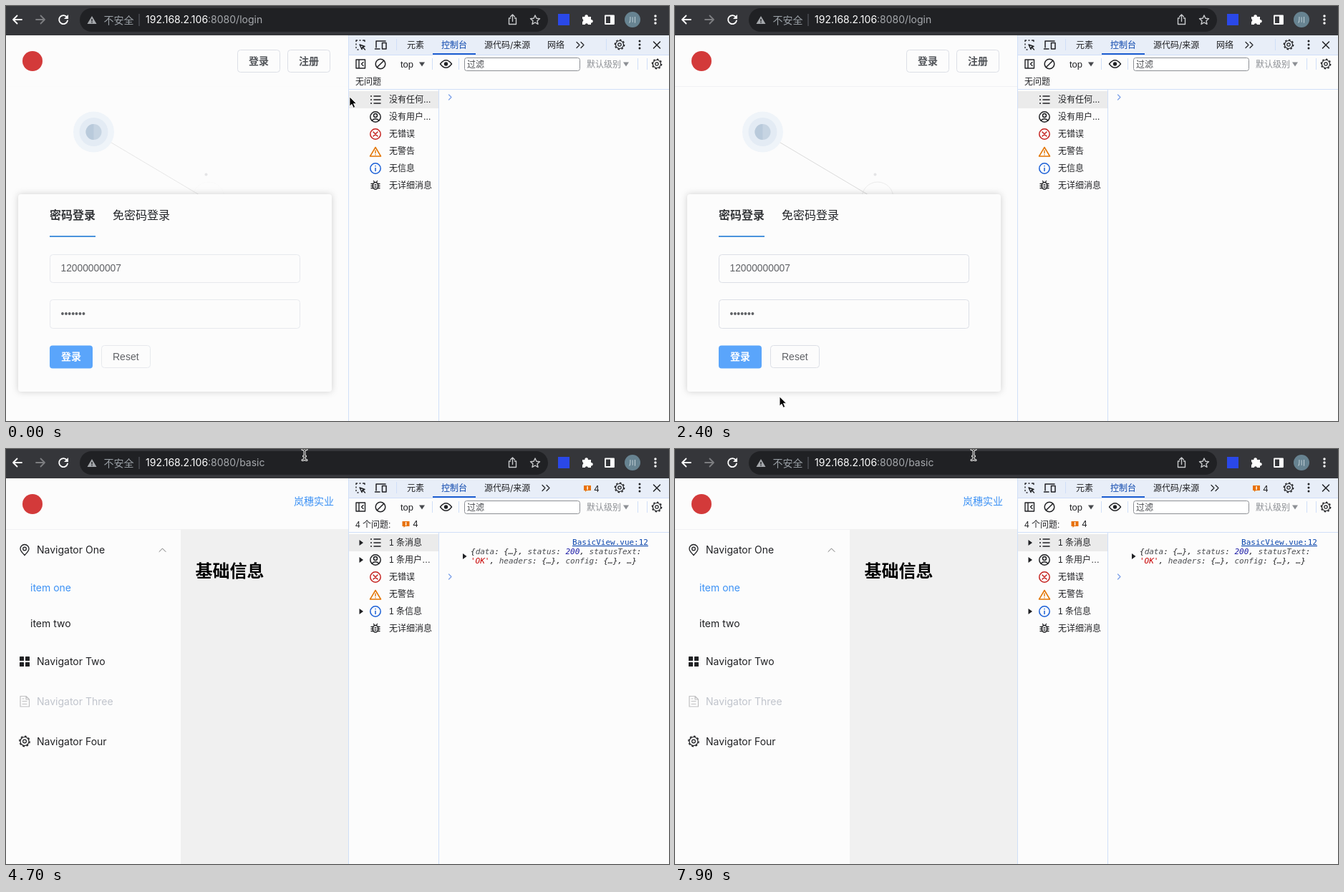
An HTML page that plays this animation: 926 px wide and 580 px high, repeating every 8 s.

```html
<!DOCTYPE html>
<html lang="zh-CN">
<head>
<meta charset="utf-8">
<style>
html, body { margin: 0; width: 100%; height: 100%; overflow: hidden; background: #fcfcfc; }
svg { display: block; }
text { font-family: Inter, "Noto Sans CJK SC", "Noto Sans CJK", sans-serif; white-space: pre; }
.arial { font-family: "Liberation Sans", "Noto Sans CJK SC", sans-serif; }
.mono { font-family: "DejaVu Sans Mono", "Noto Sans CJK SC", monospace; }
.line { fill: none; stroke-linecap: round; stroke-linejoin: round; }
</style>
</head>
<body>
<svg id="stage" width="926" height="580" viewBox="0 0 926 580"></svg>
<script>
const LOOP = 8000, LOGIN = 2900;
const INK = '#202124', BLUE = '#3d92f5', LINK = '#0b46ad', EDGE = '#d0dff8';

// Markup helpers; text is placed by its left edge and vertical middle.
const text = (x, y, size, str, fill = INK, more = '') =>
  `<text x="${x}" y="${y + size * .36}" font-size="${size}" fill="${fill}" ${more}>${str}</text>`;
const rect = (x, y, w, h, fill, more = '') =>
  `<rect x="${x}" y="${y}" width="${w}" height="${h}" fill="${fill}" ${more}/>`;
const box = (x, y, w, h, fill = 'none', stroke = '#dcdfe6', rx = 4) =>
  rect(x + .5, y + .5, w - 1, h - 1, fill, `stroke="${stroke}" rx="${rx}"`);
const dot = (x, y, r, fill, more = '') => `<circle cx="${x}" cy="${y}" r="${r}" fill="${fill}" ${more}/>`;
const ring = (x, y, r, stroke, w = 1.5, more = '') =>
  dot(x, y, r, 'none', `stroke="${stroke}" stroke-width="${w}" ${more}`);
const line = (d, stroke = INK, w = 1.5) => `<path class="line" d="${d}" stroke="${stroke}" stroke-width="${w}"/>`;
const shape = (d, fill = INK) => `<path d="${d}" fill="${fill}"/>`;
const group = (id, ...parts) => `<g id="${id}">${parts.join('')}</g>`;
const bold = 'font-weight="700"', medium = 'font-weight="500"';

const gear = (x, y, r) => ring(x, y, r, INK, 1.2) + ring(x, y, r * .4, INK, 1.2) +
  ring(x, y, r + 1.2, INK, 1.4, 'pathLength="16" stroke-dasharray="1"');
const dots = (x, y, gap, r, c) => [-gap, 0, gap].map(d => dot(x, y + d, r, c)).join('');
const cross = (x, y, r, c, w) => line(`M${x - r} ${y - r}l${2 * r} ${2 * r}m0 ${-2 * r}l${-2 * r} ${2 * r}`, c, w);
const down = (x, y, c) => shape(`M${x - 4} ${y - 2.5}h8l-4 6z`, c);
const right = (x, y) => shape(`M${x - 2.5} ${y - 4}v8l5.5-4z`);
const badge = (x, y) => shape(`M${x - 5} ${y - 4}h10v7h-6l-2 2v-2h-2z`, '#e8710a') + rect(x - .6, y - 3, 1.4, 5, '#fff');

const toolbar = () => [
  rect(0, 0, 926, 41, '#35363a'), rect(103, 3, 654, 33, '#202124', 'rx="16.5"'),
  line('M22 19H10M15.500 13.500L10 19l5.500 5.500', '#fff', 1.8),
  line('M42 19h12M48.500 13.500L54 19l-5.500 5.500', '#7c7d80', 1.8),
  group('reload', line('M85.300 16a6 6 0 1 0 .700 4.500', '#fff', 1.8), shape('M87 12v6h-6z', '#fff')),
  group('stop', cross(80, 19, 5, '#fff', 1.8)),
  shape('M120 14l6.500 11h-13z', '#a4a7ab'), rect(119.3, 18, 1.4, 3.5, '#202124'), rect(119.3, 22.4, 1.4, 1.3, '#202124'),
  `<svg id="label" x="136" y="5" width="43" height="30">${text(.5, 14.5, 14, '不安全', '#9aa0a6')}</svg>`,
  group('bar', rect(185.5, 11, 1, 17, '#5f6368')),
  group('url', text(195, 19, 14, '192.168.2.106<tspan fill="#a6a9ad" id="path"></tspan>', '#fff')),
  line('M704.500 17h-2v8.500h10V17h-2M707.500 21.500v-9M704.500 15l3-3 3 3', '#c8cacc', 1.4),
  line('M739 13l1.900 4.300 4.600.400-3.500 3.100 1 4.600-4-2.400-4 2.400 1-4.600-3.500-3.100 4.600-.400z', '#c8cacc', 1.4),
  rect(771, 11, 16, 16, '#2a48e8'),
  shape('M805 15h3.500a2.200 2.200 0 1 1 4.300 0h4.200v4a2.300 2.300 0 1 1 0 4.500V26h-4a2.200 2.200 0 0 0-4.300 0H805v-4a2.200 2.200 0 0 0 0-4z', '#fff'),
  line('M837 13.500h12v11.500h-12z', '#fff', 1.8), rect(844, 13, 5, 12, '#fff'),
  dot(875, 19, 11, '#678391'), text(870, 19, 10, '川', '#dce7ec'),
  dots(907, 19, 5, 1.7, '#fff')
].join('');

const header = () => dot(37, 77, 14, '#d33a3a');

const loginPage = () => group('login', header(),
  box(323, 61, 60, 32), text(339, 77, 14, '登录', '#505358', bold),
  box(393, 61, 60, 32), text(409, 77, 14, '注册', '#505358', bold),
  group('soft', rect(0, 112, 479, 1, '#f1f1f3'), ring(283, 268, 22, '#ececec', 1)),
  group('thread', line('M132 182L270 264', '#dadada', 1)),
  dot(279.5, 235.5, 2, '#e4e4e6'),
  dot(122.5, 176, 28.5, '#eff4f9'), dot(122.5, 176, 20, '#e3ebf4'), dot(122.5, 176, 11, '#c6d4e2'),
  shape('M122.500 165a11 11 0 0 0 0 22z', '#b9cadb'),
  rect(17, 263, 438, 276, '#fcfcfc', 'rx="4" style="filter:drop-shadow(0 0 5px rgba(0,0,0,.18))"'),
  text(61, 292.5, 16, '密码登录', '#35373a', bold), text(149, 292.5, 16, '免密码登录', '#222428'),
  rect(61, 321, 64, 2, '#4a93dc'),
  group('fields', box(61, 347, 350, 40), box(61, 410, 350, 41), box(133, 474, 69, 32)),
  text(76.5, 366.5, 13.8, '12000000007', '#606266', 'class="arial"'),
  text(76.5, 430, 14, '•••••••', '#606266', 'class="arial"'),
  rect(61, 474.5, 60, 32, '#5aa5fb', 'rx="4"'), text(77, 490, 14, '登录', '#fff', bold),
  text(149, 490, 14, 'Reset', '#606266', 'class="arial"'));

const basicPage = () => group('basic', header(),
  rect(0, 112, 479, 1, '#f1f1f3'), rect(244, 112, 235, 468, '#f0f0f0'),
  text(402, 73, 14, '岚穗实业', BLUE),
  line('M26 148.500c-3-3.500-6-6-6-9a6 6 0 0 1 12 0c0 3-3 5.500-6 9z', INK, 1.3), ring(26, 139.5, 2.3, INK, 1.3),
  text(43, 141, 14, 'Navigator One'), line('M214 143.500l4.500-4.500 4.500 4.500', '#777', 1),
  text(34, 194, 14, 'item one', BLUE), text(34, 244, 14, 'item two'),
  [[19, 290], [27, 290], [19, 298], [27, 298]].map(([x, y]) => rect(x, y, 6, 6, INK, 'rx=".500"')).join(''),
  text(43, 297, 14, 'Navigator Two'),
  line('M20 345.500h8l4.500 4.500v10h-12.500zM28 345.500v4.500h4.500M23 352.500h6M23 356.500h6M23 349h2', '#c0c0c2', 1.2),
  text(43, 353, 14, 'Navigator Three', '#c0c4cc'),
  gear(26, 408.5, 6), text(43, 408.5, 14, 'Navigator Four'),
  text(264.5, 170, 24, '基础信息', '#000', bold),
  group('toast', box(173, 57, 127, 48, '#eaf6e4', '#dcf0d2'), dot(201, 81, 7.5, '#54b02e'),
    line('M197.800 81.200l2.300 2.300 4.200-4.300', '#fff', 1.5), text(219, 81, 14, '登陆成功!', '#61b83a')));

// Console values: quoted strings red, numbers blue, keys grey.
const log = (x, y, str) => text(x, y, 11, str.replace(/'[^']*'?|\b\d+|\w+(?=:)/g, s =>
  `<tspan fill="${s[0] == "'" ? '#c80000' : /\d/.test(s) ? '#1a1aa6' : '#4a4c50'}">${s}</tspan>`),
  INK, 'class="mono" font-style="italic"');
const source = (y, name) =>
  text(897, y, 11, name, LINK, 'class="mono" text-anchor="end" text-decoration="underline"');

const devtools = () => [
  rect(479, 41, 447, 539, '#fcfcfc'), rect(479, 41, 447, 27, '#e8eef8'),
  rect(478, 41, 1, 539, EDGE), rect(479, 68, 447, 1, EDGE), rect(479, 116, 447, 1, EDGE), rect(604, 117, 1, 463, EDGE),
  line('M492 61h-1M489 58.500v-1M489 54v-1M489 49.500v-1.500h1.500M494 48h1M498.500 48h2.500v1.500M494 54l7 2.500-3 1-1 3zM498 57.500l3.500 3.500', INK, 1.4),
  line('M517 58V49h13M515.500 60h6.500M525.500 51.500h5.500v8.500h-5.500z', INK, 1.5),
  [545, 632, 882, 895].map((x, i) => rect(x, i ? 73 : 46, 1, 16, EDGE)).join(''), rect(595, 73, 1, 16, EDGE),
  text(560, 54.5, 12, '元素'), text(608, 54.5, 12, '控制台', LINK), rect(596, 66, 60, 2, '#1f5fd0'),
  text(668, 54.5, 12, '源代码/来源'),
  group('network', text(756, 54.5, 12, '网络'), rect(838, 46, 1, 16, EDGE)),
  group('more', line('M0 50.500l4 4-4 4M6 50.500l4 4-4 4', INK, 1.2)),
  group('count', badge(812, 55), text(821, 55.5, 12, '<tspan class="issues"></tspan>')),
  gear(857, 54, 5.5), dots(885, 54, 5, 1.5, INK), cross(909, 54.5, 4.5, INK, 1.5),
  line('M489 75h12.500v12H489zM493 75v12M499 78.500l-2.500 2.500 2.500 2.500', INK, 1.4),
  ring(523, 81, 6.8, INK), line('M518.200 85.800l9.600-9.600'),
  text(551, 81, 13, 'top', INK, 'class="arial"'), down(581, 81, '#47494d'),
  line('M606.500 81q8-10.500 16 0q-8 10.500-16 0z', INK, 1.4), dot(614.5, 81, 2.7, INK),
  box(640, 72, 162, 19, '#fff', '#8c8f94', 3), text(644, 81.5, 12, '过滤', '#47494d'),
  text(811, 81.5, 12, '默认级别', '#8c8f94'), down(866, 81, '#8c8f94'), gear(909, 81, 5.5),
  `<text id="summary" x="488" y="109.500" font-size="12" fill="${INK}" class="arial"></text>`,
  group('summaryBadge', badge(558.5, 105), text(568, 105, 12, '<tspan class="issues"></tspan>')),
  rect(479, 119, 125, 24, '#ebebeb'),
  [126, 131, 136].map(y => dot(510, y, 1, INK) + line(`M514 ${y}h9`)).join(''),
  ring(516, 155, 7.2, INK), ring(516, 153, 2.5, INK), line('M511 160q5-4.500 10 0'),
  ring(516, 179, 7.2, '#c5221f'), cross(516, 179, 3, '#c5221f', 1.5),
  line('M516 197.500l7.500 12.500h-15z', '#e37400'), line('M516 202v3.500M516 207.700v.200', '#e37400', 1.4),
  ring(516, 227, 7.2, '#1a5fd6'), line('M516 226.500v4M516 223.500v.200', '#1a5fd6', 1.5),
  rect(512.5, 246.5, 7, 9.5, 'none', `rx="3.500" stroke="${INK}" stroke-width="1.500"`),
  line('M510 248.500h2.500m7 0h2.500M510 251.500h2.500m7 0h2.500M510 254.500h2.500m7 0h2.500M513.500 244.500l1 1.500m4-1.500l-1 1.500M515 250h2M515 253h2', INK, 1.3),
  group('noLogs', text(535, 131, 12, '没有任何…'), text(535, 155, 12, '没有用户…'), text(535, 227, 12, '无信息')),
  group('logs', [131, 155, 227].map((y, i) => right(496, y) +
    text(535, y, 12, `<tspan class="logCount"></tspan> 条${['消息', '用户…', '信息'][i]}`, INK, 'class="arial"')).join(''),
    group('first', source(130, 'LoginView.vue:91'), right(640.5, 145),
      log(649, 145, "{code: 0, msg: '登陆成功!', data: {…}}"), rect(633, 156, 267, 1, EDGE)),
    group('entry', source(130, 'BasicView.vue:12'), right(640.5, 150),
      log(649, 143, '{data: {…}, status: 200, statusText:'),
      log(649, 156, "'OK', headers: {…}, config: {…}, …}"))),
  text(535, 179, 12, '无错误'), text(535, 203, 12, '无警告'), text(535, 251, 12, '无详细消息'),
  group('prompt', line('M618.500 124l3.500 3.500-3.500 3.500', '#7a9fe8', 1.2))
].join('');

const BEAM = 'M-3-7.500q3 0 3 2.500v10q0 2.500-3 2.500M3-7.500q-3 0-3 2.500M3 7.500q-3 0-3-2.500M-1.500 2h3';
const cursors = () => group('arrow',
    '<path d="M0 0v13l3-2.700 2.200 5 2.400-1-2.200-4.900h4z" fill="#000" stroke="#fff" stroke-width=".800"/>') +
  group('beam', line(BEAM, '#fff', 3), line(BEAM, '#222', 1.1));

const $ = id => document.getElementById(id);
$('stage').innerHTML = rect(0, 0, 926, 580, '#fcfcfc') + loginPage() + basicPage() + devtools() + toolbar() + cursors();

const show = (id, on) => $(id).style.display = on ? '' : 'none';
const move = (id, x, y) => $(id).setAttribute('transform', `translate(${x} ${y})`);
const fill = (name, str) => document.querySelectorAll('.' + name).forEach(e => e.textContent = str);
const clamp = v => Math.max(0, Math.min(1, v));
const ease = v => v * v * (3 - 2 * v);

// Each reload: address label folds, console clears, page blanks, page returns.
const reloads = [-750, 250, 1100, 3850, 4850, 5700, 6550, 7250];
const CLEAR = 200, BLANK = 350, BACK = 550, DONE = 620;
const pointer = [[0, 480, 127], [350, 414, 20], [1800, 414, 20], [2300, 160, 560],
  [2650, 91, 490], [2930, 91, 490], [3200, 398, 32], [3400, 417, 8], [LOOP, 417, 8]];

function pointerAt(t) {
  const i = pointer.findIndex(p => p[0] > t), [a, x, y] = pointer[i - 1], [b, x2, y2] = pointer[i];
  const k = ease((t - a) / (b - a));
  return [x + (x2 - x) * k, y + (y2 - y) * k];
}

function draw(t) {
  const start = reloads.filter(p => p <= t).pop(), u = t - start;
  const signedIn = t >= LOGIN, fresh = t < 3850 + BLANK;
  const blank = u >= BLANK && u < BACK, busy = u < DONE;
  const logs = signedIn && (u < CLEAR || u >= BACK);

  show('login', !signedIn && !blank);
  show('basic', signedIn && !blank);
  const appear = u < BLANK ? 1 : clamp((u - BACK) / 500);
  $('soft').style.opacity = appear ** 2;
  $('thread').style.opacity = $('fields').style.opacity = .4 + .6 * appear;
  const drop = ease(clamp((t - LOGIN) / 250));
  show('toast', fresh);
  $('toast').style.opacity = drop;
  move('toast', 0, 48 * (drop - 1));

  show('stop', busy);
  show('reload', !busy);
  const fold = u < 120 ? clamp(u / 40) : clamp((270 - u) / 150) ** 1.2, shift = 59 * fold;
  $('label').setAttribute('width', Math.max(0, 43 - shift));
  show('bar', fold < .9);
  move('bar', -shift, 0);
  move('url', -shift, 0);
  $('path').textContent = ':8080/' + (signedIn ? 'basic' : 'login');

  const issues = fresh ? 6 : 4;
  ['logs', 'count', 'summaryBadge'].forEach(id => show(id, logs));
  ['noLogs', 'network'].forEach(id => show(id, !logs));
  $('summary').textContent = signedIn && !blank ? issues + ' 个问题:' : '无问题';
  fill('issues', issues);
  fill('logCount', fresh ? 2 : 1);
  show('first', fresh);
  move('entry', 0, fresh ? 37.5 : 0);
  move('prompt', 0, !logs ? 0 : fresh ? 88.5 : 51);
  move('more', logs ? 749 : 797, 0);

  const [x, y] = pointerAt(t), beam = y < 41;
  show('beam', beam);
  show('arrow', !beam);
  move('beam', x, y);
  move('arrow', x, y);
}

const begin = performance.now();
(function tick() {
  draw((performance.now() - begin) % LOOP);
  requestAnimationFrame(tick);
})();
</script>
</body>
</html>
```
